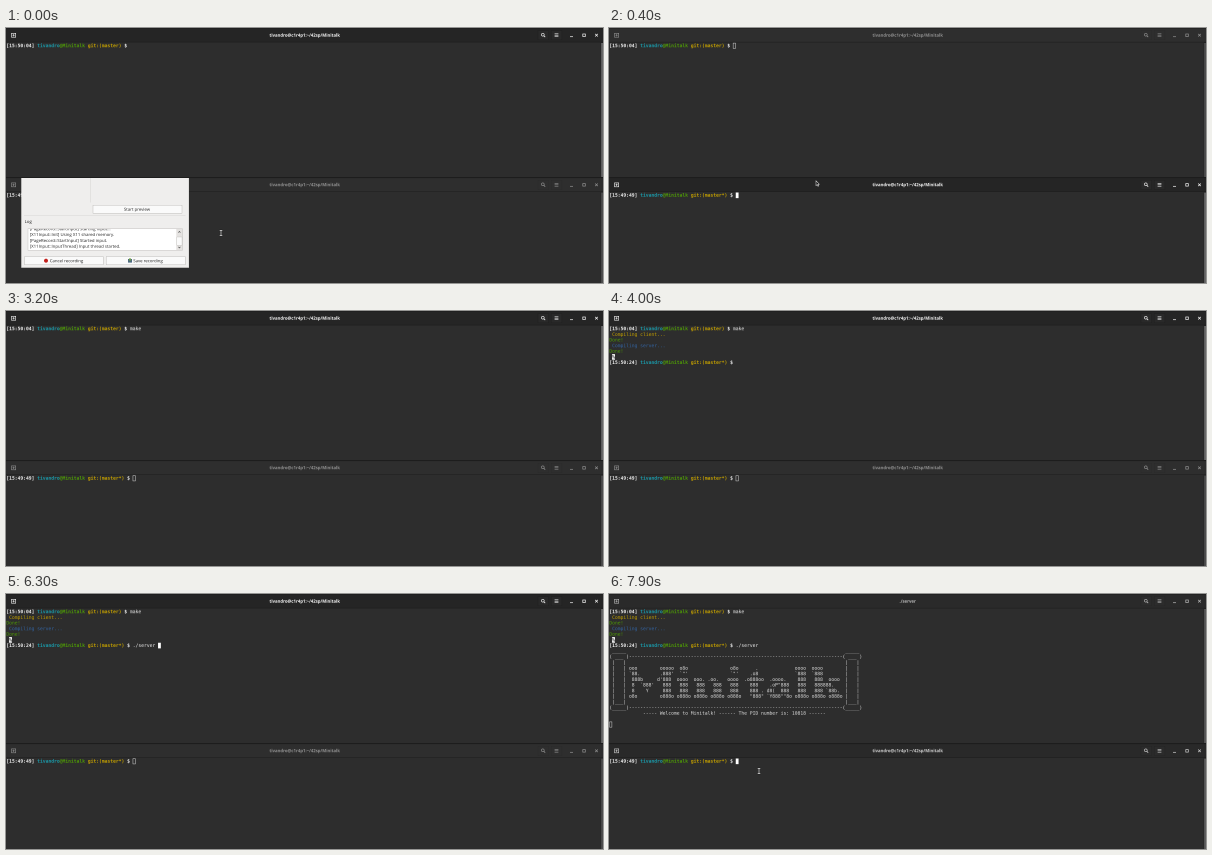
An HTML page with a canvas for the animation above (8000 ms loop, 597x255 px).

```html
<!DOCTYPE html>
<html lang="en">
<head>
<meta charset="utf-8">
<title>Two terminals</title>
<style>
  html, body { margin: 0; width: 100%; height: 100%; overflow: hidden; background: #2d2d2d; }
  canvas { display: block; width: 597px; height: 255px; }
</style>
</head>
<body>
<canvas id="stage" width="597" height="255"></canvas>
<script>
const W = 597, H = 255, LOOP = 8000, STEP = 100;
const SS = 4; // supersampling keeps the tiny text at exact positions
const view = document.getElementById('stage').getContext('2d');
const buffer = document.createElement('canvas');
buffer.width = W * SS;
buffer.height = H * SS;
const g = buffer.getContext('2d');

const CELL = 2.81, LINE = 5.64, LEFT = 0.3, TOP = 14.9;
const LOWER = 149.6;
const MONO = '"DejaVu Sans Mono", monospace';
const SANS = '"Open Sans", sans-serif';
const USER = 'tivandro';
const HOME = USER + '@c1r4p1:~/42sp/Minitalk';
const COLOR = {
  text: '#dcdcdc', bright: '#f0f0f0', cyan: '#1b9aaa',
  green: '#4e9a06', yellow: '#c4a000', blue: '#3465a4'
};

const ART = [
  `ooo        ooooo  o8o               o8o      .             oooo  oooo`,
  `\`88.       .888'  \`"'               \`"'    .o8             \`888  \`888`,
  ` 888b     d'888  oooo  ooo. .oo.   oooo  .o888oo  .oooo.    888   888  oooo`,
  ` 8  \`888'   888   888   888   888   888    888    .oP"888   888   888888.`,
  ` 8    Y     888   888   888   888   888    888 . d8(  888   888   888 \`88b.`,
  `o8o        o888o o888o o888o o888o o888o   "888" \`Y888""8o o888o o888o o888o`
];

const POINTER = [
  [[0, 215, 205], [100, 215, 205], [400, 207, 155], [900, 180, 23], [2100, 180, 23]],
  [[7200, 146, 39], [7400, 148, 115], [7600, 150, 188], [7700, 150, 177], [8000, 150, 177]]
];

const KEYS = {
  make: [[2200, 1], [2300, 2], [2400, 3], [2600, 4]],
  './server ': [[5200, 1], [5400, 2], [5500, 3], [5600, 4], [5800, 5], [5900, 9]]
};

const ramp = (t, a, b) => Math.min(1, Math.max(0, (t - a) / (b - a)));

function typed(word, t) {
  let n = 0;
  for (const [at, count] of KEYS[word]) if (t >= at) n = count;
  return word.slice(0, n);
}

function rect(x, y, w, h, color) {
  g.fillStyle = color;
  g.fillRect(x, y, w, h);
}

function frame(x, y, w, h, color, lw = 0.4) {
  g.strokeStyle = color;
  g.lineWidth = lw;
  g.strokeRect(x, y, w, h);
}

function path(points, color, lw) {
  g.strokeStyle = color;
  g.lineWidth = lw;
  g.beginPath();
  points.forEach(([x, y], i) => i ? g.lineTo(x, y) : g.moveTo(x, y));
  g.stroke();
}

// Text is laid out in buffer pixels so that its size is not rounded.
function label(text, x, y, size, color, { font = SANS, bold = false, align = 'left' } = {}) {
  g.save();
  g.setTransform(1, 0, 0, 1, 0, 0);
  g.font = `${bold ? 'bold ' : ''}${size * SS}px ${font}`;
  g.textAlign = align;
  g.textBaseline = 'alphabetic';
  g.fillStyle = color;
  g.fillText(text, x * SS, y * SS);
  g.restore();
}

function put(oy, text, col, row, color = COLOR.text, bold = false) {
  g.save();
  g.setTransform(1, 0, 0, 1, 0, 0);
  g.font = `${bold ? 'bold ' : ''}${4.68 * SS}px ${MONO}`;
  g.textBaseline = 'alphabetic';
  g.fillStyle = color;
  const y = (oy + TOP + row * LINE + 4.35) * SS;
  [...text].forEach((ch, i) => {
    if (ch !== ' ') g.fillText(ch, (LEFT + (col + i) * CELL) * SS, y);
  });
  g.restore();
}

function prompt(oy, row, time, branch) {
  let col = 0;
  const add = (text, color) => {
    put(oy, text, col, row, color, true);
    col += text.length;
  };
  add(`[${time}] `, COLOR.bright);
  add(USER, COLOR.cyan);
  add('@Minitalk ', COLOR.green);
  add(`git:(${branch}) `, COLOR.yellow);
  add('$ ', COLOR.bright);
  return col;
}

function caret(oy, col, row, solid) {
  const x = LEFT + col * CELL, y = oy + TOP + row * LINE;
  if (solid) rect(x, y, CELL, LINE, '#ffffff');
  else frame(x + 0.2, y + 0.2, CELL - 0.4, LINE - 0.4, '#e4e4e4', 0.45);
}

function gray(a, b, k) {
  const v = Math.round(a + (b - a) * k);
  return `rgb(${v},${v},${v})`;
}

function icons(oy, ink) {
  const y = oy + 7.2;
  frame(5.5, y - 1.9, 4.2, 3.9, ink, 0.6);
  path([[7.6, y - 1.1], [7.6, y + 1.2]], ink, 0.6);
  path([[6.5, y], [8.7, y]], ink, 0.6);
  g.strokeStyle = ink;
  g.lineWidth = 0.65;
  g.beginPath();
  g.arc(536.8, y - 0.5, 1.4, 0, Math.PI * 2);
  g.stroke();
  path([[537.8, y + 0.5], [539.2, y + 1.9]], ink, 0.8);
  for (const d of [-1.4, 0, 1.4]) path([[548.6, y + d], [552.4, y + d]], ink, 0.6);
  path([[564, y + 1.5], [567, y + 1.5]], ink, 0.7);
  frame(576.8, y - 1.2, 2.5, 2.5, ink, 0.7);
  path([[589.2, y - 1.3], [591.8, y + 1.3]], ink, 0.7);
  path([[591.8, y - 1.3], [589.2, y + 1.3]], ink, 0.7);
}

function terminal(oy, title, focus) {
  rect(0, oy, W, 149.8, '#2d2d2d');
  rect(0, oy, W, 14.2, gray(46, 37, focus));
  rect(0, oy, W, 0.5, '#1c1c1c');
  rect(0, oy + 13.9, W, 0.4, '#181818');
  for (const x of [532, 545.3]) {
    rect(x, oy + 2.6, 10.6, 9.2, gray(46, 41, focus));
    frame(x, oy + 2.6, 10.6, 9.2, gray(40, 28, focus), 0.3);
  }
  const ink = gray(145, 248, focus);
  label(title, 298.7, oy + 8.7, 4.25, ink, { bold: true, align: 'center' });
  icons(oy, ink);
  rect(594.6, oy + 14.3, 2.4, 135, '#252525');
  rect(595.5, oy + 15, 1.1, 134, gray(105, 150, focus));
}

function banner() {
  const edge = (row, side) => [0, 83].forEach(col => put(0, side, col, row));
  const dashes = '-'.repeat(76);
  edge(7, ' _____ ');
  edge(8, '( ___ )');
  put(0, dashes, 7, 8);
  for (let row = 9; row < 16; row++) edge(row, ' |   | ');
  ART.forEach((line, i) => put(0, line, 7, 10 + i));
  edge(16, ' |___| ');
  edge(17, '(_____)');
  put(0, dashes, 7, 17);
  put(0, '----- Welcome to Minitalk! ------ The PID number is: 10818 ------', 12, 18);
}

function upper(t, active, focus) {
  const title = t >= 6400 ? './server' : t >= 3300 && t < 3900 ? 'make' : HOME;
  terminal(0, title, focus);

  let col = prompt(0, 0, '15:50:04', 'master'), row = 0;
  const first = typed('make', t);
  put(0, first, col, 0, COLOR.bright);
  col += first.length;

  if (t >= 3300) [col, row] = [0, 1];
  if (t >= 3400) {
    put(0, ' Compiling client...', 0, 1, COLOR.yellow);
    row = 2;
  }
  if (t >= 3600) {
    put(0, 'Done!', 0, 2, COLOR.green);
    put(0, ' Compiling server...', 0, 3, COLOR.blue);
    row = 4;
  }
  if (t >= 3900) {
    put(0, 'Done!', 0, 4, COLOR.green);
    caret(0, 1, 5, true);
    put(0, '%', 1, 5, '#2d2d2d', true);
    col = prompt(0, 6, '15:50:24', 'master*');
    row = 6;
    const second = typed('./server ', t);
    put(0, second, col, 6, COLOR.bright);
    col += second.length;
  }
  if (t >= 6400) {
    banner();
    [col, row] = [0, 20];
  }

  const blank = [[0, 100], [1500, 2100], [3200, 3300], [3900, 4500], [5100, 5200], [7000, 7600]];
  if (!active) caret(0, col, row, false);
  else if (!blank.some(([a, b]) => t >= a && t < b)) caret(0, col, row, true);
}

function lower(t, active, focus) {
  terminal(LOWER, HOME, focus);
  const col = prompt(LOWER, 0, '15:49:49', 'master*');
  if (!active || t < 700 || t >= 7900) caret(LOWER, col, 0, active);
}

function button(x, y, w, h, text, cx) {
  rect(x, y, w, h, '#fafafa');
  frame(x, y, w, h, '#b4b2b0');
  label(text, cx, y + h / 2 + 1.5, 4.3, '#222', { align: 'center' });
}

function recorder() {
  rect(15.4, 149, 167.4, 90.6, '#efeeed');
  frame(15.4, 149, 167.4, 90.6, '#c8c6c4');
  path([[84.5, 149], [84.5, 174.5]], '#cfcdcb', 0.4);
  path([[18, 187.6], [179.5, 187.6]], '#d6d4d2', 0.4);
  button(87, 177.2, 89, 8, 'Start preview', 131);
  label('Log', 18.6, 195, 4.3, '#222');

  g.save();
  g.beginPath();
  g.rect(22, 200.8, 154.5, 21.4);
  g.clip();
  rect(22, 200.8, 154.5, 21.4, '#ffffff');
  [
    '[PageRecord::StartInput] Starting input...',
    '[X11Input::Init] Using X11 shared memory.',
    '[PageRecord::StartInput] Started input.',
    '[X11Input::InputThread] Input thread started.'
  ].forEach((line, i) => label(line, 23.8, 202.3 + i * 5.8, 4.3, '#222'));
  rect(170.3, 200.8, 6.2, 21.4, '#e4e2e0');
  rect(170.8, 209, 5.2, 8.2, '#fafafa');
  frame(170.8, 209, 5.2, 8.2, '#b4b2b0', 0.3);
  path([[172.4, 204.6], [173.4, 203.4], [174.4, 204.6]], '#444', 0.6);
  path([[172.4, 218.8], [173.4, 220], [174.4, 218.8]], '#444', 0.6);
  g.restore();
  frame(22, 200.8, 154.5, 21.4, '#bbb9b7');

  button(18.6, 228.6, 78.6, 8.2, 'Cancel recording', 60.5);
  button(100.2, 228.6, 79, 8.2, 'Save recording', 142);
  g.fillStyle = '#c3201c';
  g.beginPath();
  g.arc(40, 232.7, 2, 0, Math.PI * 2);
  g.fill();
  rect(122, 231, 4, 3.6, '#4d6a80');
  rect(123, 230.4, 2, 2.2, '#70a04a');
}

function pointer(t) {
  for (const keys of POINTER) {
    for (let i = 1; i < keys.length; i++) {
      const [t0, x0, y0] = keys[i - 1], [t1, x1, y1] = keys[i];
      if (t < t0 || t >= t1) continue;
      const k = (t - t0) / (t1 - t0);
      drawPointer(x0 + (x1 - x0) * k, y0 + (y1 - y0) * k);
      return;
    }
  }
}

function drawPointer(x, y) {
  if (y > LOWER && y < LOWER + 14) {
    g.beginPath();
    [[0, -2.2], [0, 2.6], [1.1, 1.7], [2, 3.3], [2.7, 2.9], [1.9, 1.4], [3.3, 1.2]]
      .forEach(([dx, dy]) => g.lineTo(x + dx, y + dy));
    g.closePath();
    g.fillStyle = '#111';
    g.fill();
    g.strokeStyle = '#f0f0f0';
    g.lineWidth = 0.5;
    g.stroke();
    return;
  }
  for (const [ink, lw] of [['#111', 1.3], ['#f4f4f4', 0.65]]) {
    path([[x, y - 2.5], [x, y + 2.5]], ink, lw);
    path([[x - 1.3, y - 2.6], [x + 1.3, y - 2.6]], ink, lw);
    path([[x - 1.3, y + 2.6], [x + 1.3, y + 2.6]], ink, lw);
  }
}

function draw(t) {
  const topActive = t < 100 || (t >= 900 && t < 7900);
  const focus = 1 - ramp(t, 0, 200) + ramp(t, 850, 1050) - ramp(t, 7780, 7980);
  g.setTransform(SS, 0, 0, SS, 0, 0);
  lower(t, !topActive, 1 - focus);
  if (t < 100) recorder();
  g.save();
  g.beginPath();
  g.rect(0, 0, W, LOWER);
  g.clip();
  upper(t, topActive, focus);
  g.restore();
  rect(0, LOWER - 0.4, W, 0.8, '#191919');
  pointer(t);

  view.imageSmoothingEnabled = true;
  view.imageSmoothingQuality = 'high';
  view.drawImage(buffer, 0, 0, W, H);
}

const start = performance.now();
let shown = -1;
function tick() {
  const elapsed = Math.max(0, performance.now() - start) % LOOP;
  const t = Math.floor(elapsed / STEP) * STEP;
  if (t !== shown) draw(shown = t);
  requestAnimationFrame(tick);
}
tick();
</script>
</body>
</html>
```
